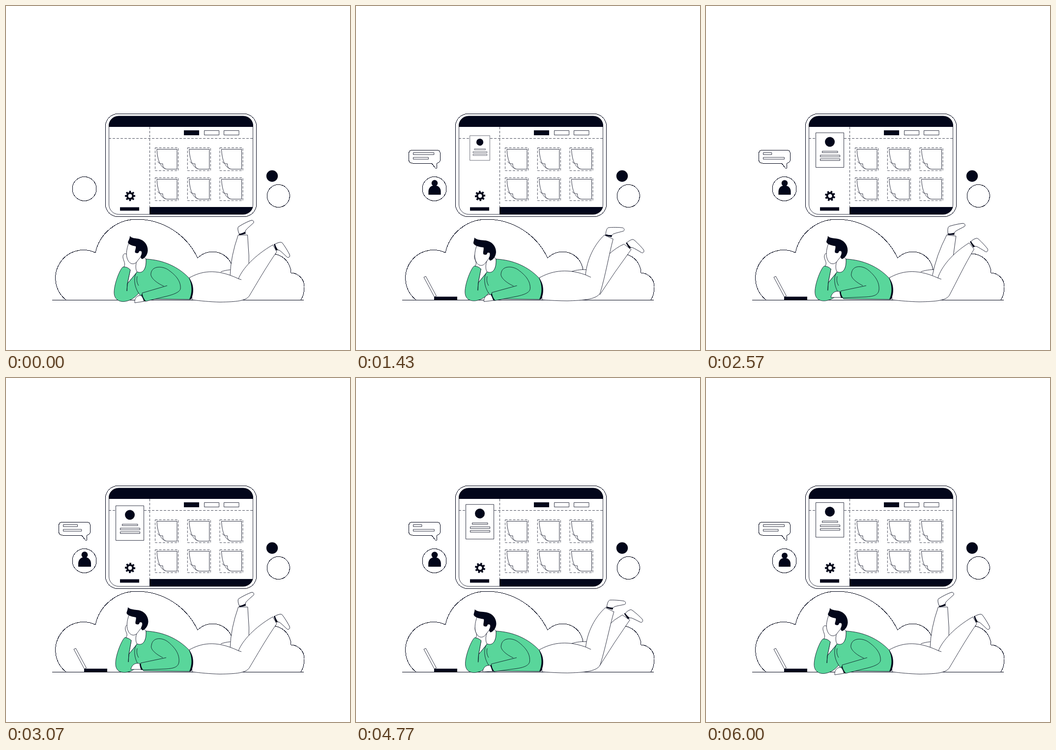
Write an HTML page that moves like this. It is 700x700 px and loops after 6.03 s.

```html
<!DOCTYPE html>
<html lang="en">
<head>
<meta charset="utf-8">
<title>Relaxed browsing</title>
<style>
  html, body { margin: 0; width: 100%; height: 100%; overflow: hidden; background: #fff; }
  svg { display: block; width: 100vw; height: 100vh; }
  .line { fill: none; }
  .ink { fill: #02061a; stroke: none; }
  .green { fill: #59d69b; }
  .dash { fill: none; stroke-width: .7; stroke-dasharray: 5 3; }
  .crisp { shape-rendering: crispEdges; stroke-width: 1; }
</style>
</head>
<body>
<svg viewBox="0 0 700 700" fill="#fff" stroke="#02061a" stroke-width=".8" stroke-linejoin="round">
  <defs>
    <g id="foot">
      <path d="M-6-4C-6-10-4-17-1-18C5-19 22-19 28-18C33-17 32-11 29-11C22-9 13-7 9-5L5-1Z"/>
      <path class="ink" d="M-7-4Q0-3 7-3L6 1Q0 0-7-2Z"/>
    </g>
    <g id="tile">
      <rect class="dash" width="47" height="46.5"/>
      <path d="M3.5 3H44.5V43.5H24C12 42 4.500 27 3.500 3Z"/>
      <path d="M5 28C8 32 12 33 15.500 32.500C15 37 17 41 21 43"/>
    </g>
  </defs>

  <!-- Clouds and ground -->
  <path class="crisp" d="M122 598A57 57 0 0 1 182 502A86 86 0 0 1 266 434A137 137 0 0 1 390 513A42 42 0 0 1 462 537"/>
  <path class="line" d="M437 541C445 538 454 536 470 536.500"/>
  <path class="line crisp" d="M525 507A40 40 0 0 1 580 543A28 28 0 0 1 607 572C607 583 604 592 600 598M94 598.500H606"/>

  <!-- Window -->
  <rect class="crisp" x="202.500" y="219.500" width="307" height="209" rx="25"/>
  <rect x="209.500" y="224" width="293" height="200" rx="20"/>
  <path class="ink" d="M209 246V244A20 20 0 0 1 229 224H483A20 20 0 0 1 503 244V246ZM292 409H502.500A20 20 0 0 1 483 424H292ZM362 253H393V263H362ZM232 409.500H271V416.500H232Z"/>
  <path class="dash" d="M292.500 246V409M209 269.500H502"/>
  <path d="M403.500 253.500H433.500V262.500H403.500ZM443.500 253.500H474V262.500H443.500Z"/>
  <g id="tiles"></g>
  <g id="gear" class="ink"></g>
  <g id="card">
    <rect x="223.500" y="253.500" width="57" height="70.500"/>
    <circle class="ink" cx="252" cy="272" r="10"/>
    <path d="M236.500 291H268V294H236.500ZM232.500 299H272.500V302.500H232.500ZM232.500 306.500H272.500V310H232.500Z"/>
  </g>

  <!-- Floating circles and chat -->
  <circle class="ink" cx="541.500" cy="346" r="11.700"/>
  <circle class="crisp" cx="554.300" cy="386.500" r="23"/>
  <circle class="crisp" cx="159.500" cy="372" r="24.500"/>
  <g id="person" class="ink">
    <circle cx="160" cy="361.500" r="6"/>
    <path d="M148 384V378C148 371 153 366 160 366S172 371 172 378V384Z"/>
  </g>
  <g id="chat">
    <path class="crisp" d="M115 293H163.500Q171.500 293 171.500 301V312Q171.500 318 165 320Q165 326 164 330.500Q162 331 160 328L154 320H115Q107.500 320 107.500 312V301Q107.500 293 115 293Z"/>
    <rect id="row1" x="116.500" y="298.500" height="4"/>
    <rect id="row2" x="116.500" y="308" height="3.800"/>
  </g>
  <g id="laptop">
    <path class="ink" d="M159 591.500H206V598.500H159Z"/>
    <path d="M138 552L142 550L163.500 590L159.500 592Z"/>
  </g>

  <!-- Legs -->
  <path id="farLeg"/>
  <use id="farFoot" href="#foot"/>
  <path id="nearLeg"/>
  <use id="nearFoot" href="#foot"/>

  <!-- Upper body -->
  <path id="hand"/>
  <path id="arm" class="green"/>
  <path d="M276 506L268 514C262 528 264 537 267 542C279 547 287 532 285 515Z"/>
  <path class="green" d="M286 515C320 517 350 530 373 554C381 568 381 585 375 597L280 596C268 585 260 570 262 552C263 546 266 541 267 541C280 546 286 532 285 515Z"/>
  <path class="ink" d="M372 553C383 565 383 585 376.500 597H373C379 585 379.500 568 372 553Z"/>
  <path class="line" d="M267 550C265 558 267 565 270 569"/>
  <path id="sleeve" class="green"/>
  <path id="lowHand"/>
  <path id="cuff" class="ink"/>
  <g id="head">
    <path d="M250 482C244 497 244 510 248 517C252 526 262 528 268 518L276 508L277 485Z"/>
    <path id="hair" class="ink"/>
  </g>
</svg>
<script>
const LOOP = 6030;
const part = {};
document.querySelectorAll('svg [id]').forEach(el => part[el.id] = el);

const mix = (a, b, k) => a + (b - a) * k;
const ease = k => (1 - Math.cos(Math.PI * Math.min(1, Math.max(0, k)))) / 2;
const ramp = (t, from, to) => ease((t - from) / (to - from));
const wave = (t, period) => (1 - Math.cos(2 * Math.PI * t / period)) / 2;
const upDown = (t, from, top, to) => ramp(t, from, top) - ramp(t, top, to);

// Blends two path strings that share the same commands.
function morph(el, a, b, k) {
  const ends = b.match(/-?[\d.]+/g);
  let i = 0;
  el.setAttribute('d', a.replace(/-?[\d.]+/g, n => mix(+n, +ends[i++], k).toFixed(2)));
}

const move = (el, value) => el.setAttribute('transform', value);

function scaleAt(el, x, y, s, dy = 0) {
  el.style.display = s > 0.01 ? '' : 'none';
  move(el, `translate(${x} ${y + dy}) scale(${s}) translate(${-x} ${-y})`);
}

for (const y of [288.5, 349.5])
  for (const x of [303.5, 369.3, 435])
    part.tiles.innerHTML += `<use href="#tile" x="${x}" y="${y}"/>`;

part.gear.innerHTML = '<circle r="5.8" fill="none" stroke="#02061a" stroke-width="3.8"/>' +
  Array.from({length: 8}, (_, i) =>
    `<rect x="-1.8" y="-10.5" width="3.6" height="4.5" transform="rotate(${i * 45})"/>`).join('');

function drawLegs(swing) {
  const bulge = 4 * swing * (1 - swing);
  const farX = mix(482, 553, swing) + 5 * bulge;
  const farY = mix(465, 489, swing) - 6 * bulge;
  const cos = Math.cos(swing * 0.7), sin = Math.sin(swing * 0.7);
  const left = [farX - 9.5 * cos, farY + 1 - 8 * sin];
  const right = [farX + 9.5 * cos, farY + 1 + 9 * sin];
  const baseL = [mix(456, 480, swing), mix(549, 545, swing)];
  const baseR = [mix(494, 496, swing), mix(550, 588, swing)];
  const bend = mix(3, -2, swing);
  part.farLeg.setAttribute('d', `M${baseL}Q${mix(457, 514, swing)} ${mix(510, 498, swing)} ${left}L${right}Q${(right[0] + baseR[0]) / 2 + bend} ${(right[1] + baseR[1]) / 2} ${baseR}`);
  move(part.farFoot, `translate(${farX} ${farY}) rotate(${mix(-27, 46, swing)})`);

  morph(part.nearLeg,
    'M479 557L473 555C481 535 505 508 543 486L551 500C530 530 510 565 495 590C488 600 470 602 435 602.5C415 602 395 600 379 598L373 553C395 541 425 532 473 555',
    'M478 552L467 547C470 515 485 485 505 466L523 474C515 505 507 550 498 580C495 598 460 599 430 600C415 600 395 599 379 598L373 553C395 541 425 532 467 547',
    swing);
  move(part.nearFoot, `translate(${mix(547, 514, swing)} ${mix(492, 469, swing) - 2 * bulge}) rotate(${58 * (1 - swing)})`);
}

function drawUpperBody(swing, sway, rest) {
  morph(part.arm,
    'M238 531C232 535 220 565 220 583C220 598 232 603 243 601C255 599 264 592 270 584C275 570 268 548 267 541L247 565L246 580L247 565L253 537Q247 530 238 531',
    'M242 528C236 532 223 563 223 581C223 596 233 600 244 599C256 597 264 592 270 584C275 570 268 548 267 541L250 562L249 578L250 562L255 534Q250 529 242 528',
    sway);
  morph(part.hand,
    'M240 531C244 525 239 518 238 512C237 504 243 502 246 506L266 518L267 541L247 565L253 537Z',
    'M244 528C249 522 244 518 243 512C242 505 246 501 248 504L266 518L267 541L250 562L255 534Z',
    sway);
  morph(part.sleeve,
    'M321 570C305 563 293 552 295 544C297 528 320 528 333 539C348 550 356 562 355 575C354 582 342 587 325 591L284 601Q277 592 277 584L328 569',
    'M319 569C305 562 293 552 296 544C298 527 318 527 331 538C345 550 353 562 352 577C351 589 340 591 325 592L278 594Q274 590 274 580L326 569',
    rest);
  morph(part.lowHand,
    'M262 604C261 596 266 588 275 589Q279 594 281 601Z',
    'M254 593C256 584 262 579 272 581Q273 588 275 593Z', rest);
  morph(part.cuff,
    'M275 588Q279 592 281 601L285 601Q279 595 277 586Z',
    'M272 582Q273 588 275 594L279 594Q275 589 274 581Z', rest);

  move(part.head, `translate(${sway - 4.2 * swing} ${4.2 * swing - 1.5 * sway})`);
  morph(part.hair,
    'M252 468C256 473 263 472 271 474C282 477 289 487 288.5 498C288 506 283 513 277 515C274 513 273 510 275 507C279 501 275 497 271 499C270 503 268 504 263 502C261 498 265 495 264 489C258 488 250 486 248 481C249 477 252 474 252 468Z',
    'M244 468C249 473 258 473 268 474C281 476 289 487 288.5 498C288 506 283 513 277 515C274 513 273 510 275 507C279 501 275 497 271 499C270 503 268 504 263 502C261 498 264 494 263 488C255 487 244 485 242 479C242 476 244 472 244 468Z',
    swing * 0.94 + 0.62 * sway * (1 - swing));
}

function draw(t) {
  const swing = wave(t, LOOP / 2);
  const sway = wave(t, LOOP / 3);
  drawLegs(swing);
  drawUpperBody(swing, sway, ramp(t, 1100, 2150) - ramp(t, 3600, 6000));

  move(part.gear, `translate(252.5 386.5) rotate(${360 * t / LOOP})`);
  scaleAt(part.laptop, 182, 598, ramp(t, 100, 550));
  scaleAt(part.person, 160, 384, ramp(t, 400, 800) * (1 + 0.08 * sway));
  scaleAt(part.chat, 163, 331, ramp(t, 750, 1200));
  scaleAt(part.card, 252, 289, ramp(t, 1130, 1600), 7.3 * upDown(t, 1200, 3600, 6000));

  const typing = upDown(t, 1300, 2500, 3700) + upDown(t, 3700, 4865, LOOP);
  part.row1.setAttribute('width', 43 - 26 * typing);
  part.row2.setAttribute('width', 30.5 + 12.5 * typing);
}

const start = performance.now();
function tick() {
  draw((performance.now() - start) % LOOP);
  requestAnimationFrame(tick);
}
draw(0);
tick();
</script>
</body>
</html>
```
